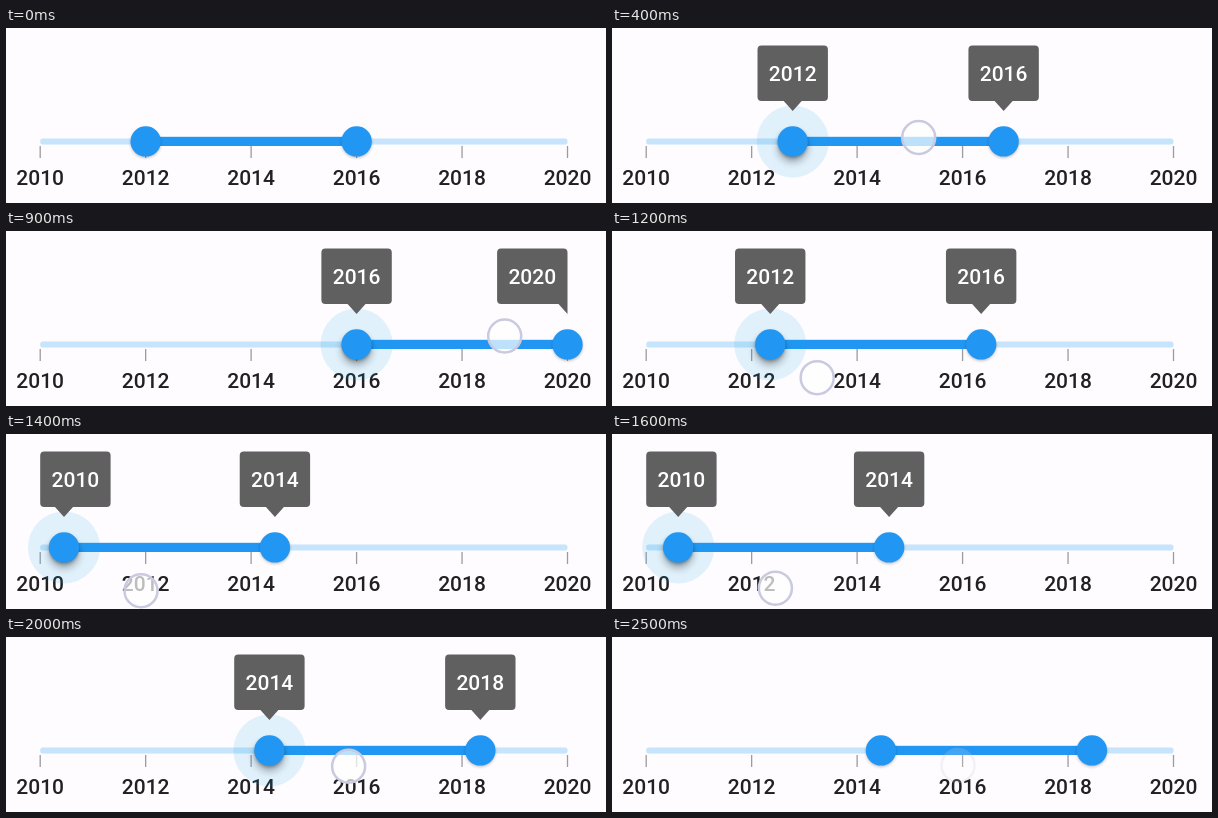
These frames come from a looping animation (600x175 px, 2600 ms). An HTML page:

```html
<!DOCTYPE html>
<html lang="en">
<head>
<meta charset="utf-8">
<title>Range slider</title>
<style>
  html, body { margin: 0; width: 100%; height: 100%; overflow: hidden; background: #fefcff; }
  svg { display: block; width: 600px; height: 175px; }
  text { font: 500 21px Roboto, Arial, sans-serif; text-anchor: middle; }
</style>
</head>
<body>
<svg id="stage" viewBox="0 0 600 175">
  <defs>
    <filter id="soft" x="-50%" y="-50%" width="200%" height="200%"><feGaussianBlur stdDeviation="1.5"/></filter>
    <filter id="deep" x="-60%" y="-60%" width="220%" height="220%"><feGaussianBlur stdDeviation="4"/></filter>
  </defs>
</svg>
<script>
const LOOP = 2600, STEP = 100;
const LEFT = 34.2, RIGHT = 561.5, FIRST = 2010, YEARS = 10;
const UNIT = (RIGHT - LEFT) / YEARS, SPAN = 4 * UNIT;
const AXIS = 113.4, TIP = 83, HALF = 35.2;
const LAG = 34, GRIP = 77;  // the thumb trails the pointer in time and in x

// Where the pointer turns or rests: time, x, y
const TURNS = [
  [0, 216.7, 139], [200, 127, 118], [640, 546, 98.3], [770, 546, 98.3],
  [1360, 135, 156.6], [1528, 135, 158], [1820, 334, 131], [2100, 346, 128.5]
];

const stage = document.getElementById("stage");

function set(el, attrs) {
  for (const key in attrs) el.setAttribute(key, attrs[key]);
}

function add(tag, attrs, parent = stage) {
  const el = document.createElementNS("http://www.w3.org/2000/svg", tag);
  set(el, attrs);
  parent.append(el);
  return el;
}

const clamp = (v, lo, hi) => Math.min(hi, Math.max(lo, v));
const ramp = (t, from, to) => clamp((t - from) / (to - from), 0, 1);
const ease = k => (1 - Math.cos(Math.PI * k)) / 2;

function pointerAt(t) {
  let [, x, y] = TURNS[0];
  for (let i = 1; i < TURNS.length; i++) {
    const [end, nextX, nextY] = TURNS[i];
    const k = ease(ramp(t, TURNS[i - 1][0], end));
    x += (nextX - x) * k;
    y += (nextY - y) * k;
  }
  return { x, y };
}

const thumbAt = t => clamp(pointerAt(t - LAG).x - GRIP, LEFT, RIGHT - SPAN);

add("rect", { x: LEFT, y: 110.4, width: RIGHT - LEFT, height: 6, rx: 2.5, fill: "#c6e4fb" });
for (let year = 0; year <= YEARS; year += 2) {
  const x = LEFT + year * UNIT;
  add("rect", { x: x - 0.65, y: 118, width: 1.3, height: 12, fill: "#9c9b9d" });
  add("text", { x, y: 157, fill: "#212121" }).textContent = FIRST + year;
}
const range = add("rect", { y: AXIS - 4.6, width: SPAN, height: 9.2, fill: "#2196f3" });
const ripple = add("circle", { cy: AXIS, fill: "#1e9fe8", "fill-opacity": 0.13 });
const lift = add("circle", { cy: AXIS + 6, r: 14, filter: "url(#deep)" });

function makeThumb() {
  const g = add("g", {});
  add("circle", { cy: AXIS + 1.5, r: 15, opacity: 0.25, filter: "url(#soft)" }, g);
  add("circle", { cy: AXIS, r: 15.2, fill: "#2196f3" }, g);
  return g;
}

function makeTooltip() {
  const g = add("g", {});
  return {
    g,
    box: add("path", { fill: "#616061" }, g),
    label: add("text", { y: 53.3, fill: "#fff" }, g)
  };
}

const thumbs = [makeThumb(), makeThumb()];
const tooltips = [makeTooltip(), makeTooltip()];
const pointer = add("circle", {
  r: 16.5, fill: "#fff", "fill-opacity": 0.7, stroke: "#c9cadf", "stroke-width": 2.5
});

// The box stays within the track; a corner under the arrow turns square.
function drawTooltip({ g, box, label }, x, scale) {
  const l = clamp(x - HALF, LEFT, RIGHT - 2 * HALF), r = l + 2 * HALF;
  const a = Math.max(x - 9, l), b = Math.min(x + 9, r);
  const cornerR = b > r - 4 ? "V73" : "V69q0 4 -4 4";
  const cornerL = a < l + 4 ? `H${l}` : `H${l + 4}q-4 0 -4 -4`;
  set(box, { d: `M${l + 4} 17.5H${r - 4}q4 0 4 4${cornerR}H${b}L${x} ${TIP}L${a} 73${cornerL}V21.5q0 -4 4 -4Z` });
  label.setAttribute("x", l + HALF);
  label.textContent = Math.floor(FIRST + (x - LEFT) / UNIT + 0.01);
  set(g, {
    transform: `translate(${x} ${TIP}) scale(${scale}) translate(${-x} ${-TIP})`,
    visibility: scale > 0 ? "visible" : "hidden"
  });
}

function draw(t) {
  const x = thumbAt(t), touch = pointerAt(t);
  const press = ramp(t, 0, 200);
  const active = press * (1 - ramp(t, 2000, 2300));
  const shown = press * (1 - ramp(t, 2000, 2200));
  range.setAttribute("x", x);
  set(ripple, { cx: x, r: 36 * active });
  set(lift, { cx: x, opacity: 0.38 * active });
  [x, x + SPAN].forEach((end, i) => {
    thumbs[i].setAttribute("transform", `translate(${end} 0)`);
    drawTooltip(tooltips[i], end, shown);
  });
  set(pointer, {
    cx: touch.x, cy: touch.y,
    opacity: ramp(t, 0, 100) * (1 - 0.78 * ramp(t, 2400, 2500))
  });
}

// The picture advances ten times a second.
const start = performance.now();
function tick(now) {
  const t = Math.max(0, now - start) % LOOP;
  draw(Math.floor(t / STEP) * STEP);
  requestAnimationFrame(tick);
}

draw(0);
requestAnimationFrame(tick);
</script>
</body>
</html>
```
